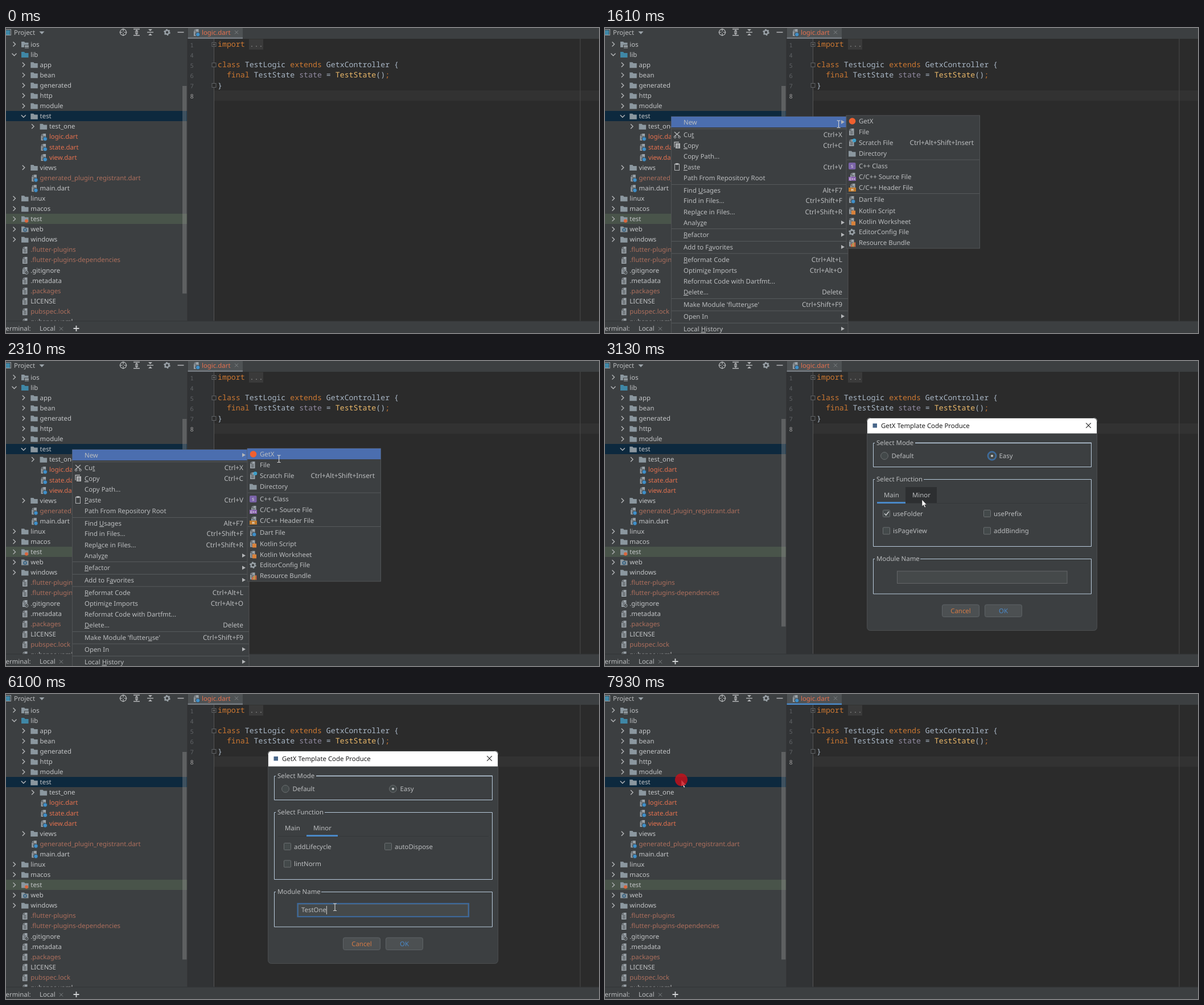
Animation of 1042 by 537 pixels, one loop 8 s. Source, as an HTML page:

```html
<!DOCTYPE html>
<html lang="en">
<head>
<meta charset="utf-8">
<title>Project window</title>
<style>
html, body { margin: 0; width: 100%; height: 100%; overflow: hidden; background: #2b2b2b; }
svg { display: block; width: 1042px; height: 537px; }
text { font: 11.4px "Noto Sans", "Open Sans", sans-serif; white-space: pre; text-rendering: geometricPrecision; }
.code { font: 13.25px "Noto Sans Mono", "DejaVu Sans Mono", monospace; }
.num { font: 10.5px "Noto Sans Mono", "DejaVu Sans Mono", monospace; }
.keys { font-size: 11.8px; text-anchor: end; }
.u { text-decoration: underline; }
</style>
</head>
<body>
<svg id="stage" viewBox="0 0 1042 537"></svg>
<script>
const LOOP = 8000;
const C = { panel: '#3c3f41', text: '#bbbdbf', icon: '#9aa2a8', fresh: '#e5714f', ignored: '#ad6f5d',
  blue: '#4a88c7', pick: '#4b6eaf', key: '#cc7832', code: '#a9b7c6', frame: '#b9cbdc' };

// shape helpers
const rect = (x, y, w, h, fill, more = '') => `<rect x="${x}" y="${y}" width="${w}" height="${h}" fill="${fill}" ${more}/>`;
const box = (x, y, w, h, fill, stroke, r = 0) => rect(x + .5, y + .5, w - 1, h - 1, fill, `stroke="${stroke}" rx="${r}"`);
const disc = (x, y, r, fill, more = '') => `<circle cx="${x}" cy="${y}" r="${r}" fill="${fill}" ${more}/>`;
const line = (d, stroke = C.icon, w = 1.2) => `<path d="${d}" fill="none" stroke="${stroke}" stroke-width="${w}"/>`;
const fill = (d, color) => `<path d="${d}" fill="${color}"/>`;
const group = (id, body, more = '') => `<g id="${id}" ${more}>${body}</g>`;
// y is the middle of the line; baselines sit on whole pixels
const text = (x, y, s, color = C.text, more = '') => `<text x="${x}" y="${Math.round(y + 4)}" fill="${color}" ${more}>${s}</text>`;
// "_" marks the underlined letter
const mnemonic = s => s.replace(/_(.)/, '<tspan class="u">$1</tspan>');
const cross = (x, y, r, color, w = 1) => line(`M${x - r} ${y - r}l${2 * r} ${2 * r}m0 ${-2 * r}l${-2 * r} ${2 * r}`, color, w);

// icons, placed by left edge and middle
const folder = (x, y, color = '#8b979f') => fill(`M${x} ${y - 4.6}h5l1.500 1.800h6v8.200h-12.500z`, color);
const page = (x, y) => fill(`M${x + 4.5} ${y - 6}h5v12h-8.500v-8.500h3.500z`, C.icon) + fill(`M${x + 1} ${y - 3.4}l2.700-2.600v2.600z`, C.icon) +
  line(`M${x + 2.7} ${y - 1}h5m-5 2.300h5m-5 2.300h5`, '#43474a', 1);
const badge = (x, y, color) => page(x, y) + disc(x + 8.2, y + 3.4, 3.7, color, `stroke="${C.panel}" stroke-width=".9"`);
const dart = (x, y) => badge(x, y, '#3f8fc9');
const tagged = (x, y, color, s) => page(x + 2, y - 1) + rect(x, y, 13, 7, color) +
  `<text x="${x + 6.5}" y="${y + 5.8}" fill="#eee" text-anchor="middle" style="font-size:6px;font-weight:700">${s}</text>`;
const gear = (x, y) => disc(x, y, 3.4, 'none', `stroke="${C.icon}" stroke-width="2.4"`) +
  disc(x, y, 5, 'none', `stroke="${C.icon}" stroke-width="1.6" stroke-dasharray="2.6 2.636"`);
const chevron = (x, y, open) => line(open ? `M${x - 4} ${y - 2}l4 4l4-4` : `M${x - 2} ${y - 4}l4 4l-4 4`, '#b4b6b8', 1.4);

// project tree: depth, kind, label, colour
const tree = [
  [0, 'ios', 'ios'], [0, 'lib', 'lib'], [1, 'dir', 'app'], [1, 'dir', 'bean'], [1, 'dir', 'generated'], [1, 'dir', 'http'],
  [1, 'dir', 'module'], [1, 'open', 'test'], [2, 'dir', 'test_one'], [2, 'dart', 'logic.dart', C.fresh],
  [2, 'dart', 'state.dart', C.fresh], [2, 'dart', 'view.dart', C.fresh], [1, 'dir', 'views'],
  [1, 'dart', 'generated_plugin_registrant.dart', C.ignored], [1, 'dart', 'main.dart'],
  [0, 'dir', 'linux'], [0, 'dir', 'macos'], [0, 'spec', 'test'], [0, 'web', 'web'], [0, 'dir', 'windows'],
  [0, 'file', '.flutter-plugins', C.ignored], [0, 'file', '.flutter-plugins-dependencies', C.ignored],
  [0, 'git', '.gitignore'], [0, 'file', '.metadata'], [0, 'file', '.packages', C.ignored], [0, 'file', 'LICENSE'],
  [0, 'file', 'pubspec.lock', C.ignored], [0, 'file', 'pubspec.yaml']
];
function treeRow([depth, kind, label, color = '#c3c5c7'], i) {
  const y = 28.6 + 18.09 * i, x = 27 + 16.3 * depth;
  let out = '';
  if (kind === 'dart') out = dart(x + 1, y + .5);
  else if (kind === 'file') out = page(x + 1, y + .5);
  else if (kind === 'git') out = page(x + 1, y + .5) + disc(x + 9, y + 4, 3, C.panel, `stroke="${C.icon}"`) + line(`M${x + 7} ${y + 6}l4-4`, C.icon, 1);
  else {
    out = chevron(x - 12.5, y, kind === 'lib' || kind === 'open') + folder(x, y, kind === 'lib' ? '#3f87a6' : undefined);
    if (kind === 'ios') out += rect(x + 5, y + 1, 9, 6, C.panel) + rect(x + 6, y + 2, 7, 3, C.icon) + rect(x + 6, y + 6, 7, 1, C.icon);
    if (kind === 'spec') out += disc(x + 9, y + 3.5, 3, '#d8673e');
    if (kind === 'web') out += disc(x + 6.5, y + 1.2, 2.4, '#8b979f', 'stroke="#315f80" stroke-width="1.6"');
  }
  return out + text(x + 16.3, y, label, color);
}

const side = rect(0, 0, 319, 537, C.panel) + rect(0, 146, 318, 18, '#0d293e') + rect(0, 327, 318, 18, '#49544a') +
  '<clipPath id="cut"><rect width="319" height="516"/></clipPath>' +
  `<g clip-path="url(#cut)">${tree.map(treeRow).join('')}</g>` + rect(310, 102, 7.5, 365.5, 'rgba(166,166,166,.32)') +
  box(-4, 2, 13, 11, 'none', C.icon) + rect(0, 4, 7, 8, '#3f87a6') + text(14, 8, 'Project') + fill('M58.500 6h9l-4.500 5z', C.icon) +
  disc(206, 7.5, 5.5, 'none', `stroke="#b4b6b8" stroke-width="1.3"`) + line('M206 1v5m0 3v5m-6.500-6.500h5m3 0h5', '#b4b6b8') +
  line('M224 2h11m-11 11h11m-8-5.500h5', '#b4b6b8', 1.4) + fill('M226.500 6l3-3l3 3zm0 3l3 3l3-3z', '#b4b6b8') +
  line('M248 7.500h11', '#b4b6b8', 1.4) + fill('M250 2l3.500 3.500l3.500-3.500zm0 11l3.500-3.500l3.500 3.500z', '#b4b6b8') +
  gear(283, 7.5) + line('M301.500 7.500h11', '#b4b6b8', 1.5);

// code lines: number, middle, [text, colour] runs
const lines = [
  [1, 29.2, [['import ', C.key]]], [4, 47.3, []],
  [5, 65.3, [['class ', C.key], ['TestLogic ', C.code], ['extends ', C.key], ['GetxController {', C.code]]],
  [6, 83.4, [['  final ', C.key], ['TestState ', C.code], ['state', '#918aa0'], [' = ', C.code], ['TestState', '#eab86a'], ['()', C.code], [';', C.key]]],
  [7, 101.5, [['}', C.code]]], [8, 119.6, []]
];
const fold = (y, s) => box(361.5, y - 4, 8, 8, '#2b2b2b', '#606366') + (s ? line(`M363.500 ${y}h4m-2-2v4`, '#777', 1) : '');
const codeRow = ([n, y, runs]) => text(323.5, y + .3, n, n === 8 ? '#a4a3a3' : '#606366', 'class="num"') +
  text(372, y, runs.map(([s, c]) => `<tspan fill="${c}">${s}</tspan>`).join(''), C.code, 'class="code"');
const editor = rect(319, 0, 723, 19, C.panel) + rect(319, 0, 97, 19, '#4e5254') + rect(319, 16.5, 97, 2.5, '#747a80', 'id="mark"') +
  dart(329, 8) + text(344, 8, 'logic.dart', C.fresh) + cross(405, 7.5, 3, '#7f8385') +
  rect(319, 19, 723, 497, '#2b2b2b') + rect(319, 19, 47, 497, '#313335') + rect(366, 110, 676, 18, '#323232') +
  rect(1008.5, 19, 1, 497, '#4b4b4b') + rect(365, 19, 1, 497, '#555555') + rect(318.5, 0, 1, 516, '#323334') +
  rect(427, 19.5, 25, 18.5, '#3a3a3a') + text(428, 29.2, '...', '#8c8c8c', 'class="code"') +
  lines.map(codeRow).join('') +
  fold(29, true) + fold(65) + fold(101) + rect(372, 111, 1.5, 17, '#bbbbbb', 'id="caret"');

const foot = rect(0, 516, 1042, 21, C.panel) + rect(0, 515.5, 1042, 1, '#333537') + text(-.5, 529.4, 'erminal:') + text(59, 529.4, 'Local') +
  cross(97, 529.5, 3, '#7f8385') + line('M118.500 529h10m-5-5v10', '#d0d2d4', 1.8);

// context menu: middle, label, shortcut (">" opens a submenu)
const entries = [
  [166, 'New', '>'], [188, 'Cu_t', 'Ctrl+X'], [207, '_Copy', 'Ctrl+C'], [226, 'Copy Path...'], [245, '_Paste', 'Ctrl+V'],
  [264, 'Path From Repository Root'], [286, 'Find _Usages', 'Alt+F7'], [304.4, 'Find in Files...', 'Ctrl+Shift+F'],
  [324, 'Repl_ace in Files...', 'Ctrl+Shift+R'], [343, 'Analy_ze', '>'], [364.4, '_Refactor', '>'], [386, 'Add to F_avorites', '>'],
  [408, '_Reformat Code', 'Ctrl+Alt+L'], [427, 'Optimi_ze Imports', 'Ctrl+Alt+O'], [446, 'Reformat Code with Dartfmt...'],
  [465, '_Delete...', 'Delete'], [487, "Make Module 'flutter_use'", 'Ctrl+Shift+F9'], [508, 'Open In', '>'], [530, 'Local _History', '>']
];
const rule = (x, w) => y => rect(x, y, w, 1, '#565a5c');
const entry = ([y, label, keys = '']) => text(138, y, mnemonic(label)) +
  (keys === '>' ? fill(`M415 ${y - 4}l6 3.500l-6 3.500z`, '#b4b6b8') : text(417, y, keys, C.text, 'class="keys"'));
const menu = group('menu', box(116, 155.5, 311.5, 390, C.panel, '#515355') + rect(116.5, 156, 308, 19, C.pick, 'id="hotNew"') +
  [177, 275, 353, 375, 396.5, 476, 497.5, 519].map(rule(117, 310)).join('') + entries.map(entry).join('') +
  line('M122 183l9 8m0-8l-9 8', '#b4b6b8', 1.3) + disc(123, 192, 1.8, 'none', 'stroke="#b4b6b8"') + disc(130.5, 192, 1.8, 'none', 'stroke="#b4b6b8"') +
  line('M122 210v-9h8', '#b4b6b8', 1.3) + rect(124, 203, 8, 9, '#b4b6b8') + line('M126 206h4m-4 2h4m-4 2h4', '#4a4e51', .8) +
  box(122, 239, 9, 12, 'none', '#b4b6b8') + rect(124, 238, 5, 3, '#b4b6b8'));

const news = [
  [164, 'GetX', y => disc(434.5, y, 5.8, '#f0602f')], [183, 'File', y => page(428, y)],
  [202, 'Scratch File', y => page(428, y) + disc(438, y - 4, 3.3, '#3f9fc9')], [221, 'Directory', y => folder(428, y)],
  [243, 'C++ Class', y => rect(428, y - 6, 12.5, 12, '#7a63a8', 'rx="2"') + text(432, y - 1, 's', '#ddd', 'style="font-size:9px"')],
  [262, 'C/C++ Source File', y => tagged(428, y, '#8a63b0', 'C++')], [281, 'C/C++ Header File', y => tagged(428, y, '#c07a2c', 'H')],
  [302, 'Dart File', y => dart(428, y)], [321.5, 'Kotlin Script', y => page(428, y) + rect(433, y, 7, 7, '#d9823b')],
  [340.5, 'Kotlin Worksheet', y => page(428, y) + rect(433, y, 7, 7, '#d9823b')], [359.4, 'EditorConfig File', y => gear(434, y)],
  [378.4, 'Resource Bundle', y => page(428, y) + rect(432, y + 2, 2.2, 5, '#d9673b') + rect(435, y, 2.2, 7, '#d9a03b') + rect(438, y - 1, 2.2, 8, '#d9673b')]
];
const submenu = group('submenu', box(423.5, 153.5, 235.5, 235, C.panel, '#515355') + rect(424, 154, 234.5, 19, C.pick, 'id="hotGet"') +
  [231.5, 291].map(rule(425, 233)).join('') + news.map(([y, s, icon]) => icon(y) + text(446, y, s)).join('') +
  text(648, 202, 'Ctrl+Alt+Shift+Insert', C.text, 'class="keys"'));

// dialog
const fieldset = (y, bottom, label, gap) => line(`M474 ${y + .5}h-2.500V${bottom - .5}H854.500V${y + .5}H${gap}`, C.frame, 1) + text(477, y + .4, label);
const check = (x, y, label, on) => box(x, y - 6.5, 13, 13, '#43494a', '#6b6f71', 1) + text(x + 18, y, label) +
  (on ? line(`M${x + 3} ${y}l2.800 3l5-6.500`, '#c5c7c9', 1.6) : '');
const radio = (x, label) => disc(x, 167, 6.4, '#43494a', 'stroke="#6b6f71"') + text(x + 12.5, 167, label);
const button = (x, label, color) => box(x, 428.5, 66, 22.5, '#4c5052', '#5e6366', 3) + text(x + 33, 440, label, color, 'text-anchor="middle"');
const dialog = group('dialog', rect(460, 100, 405, 375, C.panel, 'rx="6"') + fill('M460 127.500V106a6 6 0 0 1 6-6H859a6 6 0 0 1 6 6V127.500z', '#fff') +
  box(460, 100, 405, 375, 'none', '#4b4d4f', 6) + rect(470.5, 110, 7.5, 7.5, '#49678a') + text(485, 114, 'GetX Template Code Produce', '#1c1c1c') +
  cross(849.5, 113.5, 4.3, '#222', 1.1) +
  fieldset(144, 187, 'Select Mode', 545) + rect(545, 143.5, 310, 1.6, C.frame) + fieldset(208, 327, 'Select Function', 560) + fieldset(348, 410.5, 'Module Name', 554) +
  radio(491, 'Default') + radio(680, 'Easy') + disc(680, 167, 7.2, 'none', 'stroke="#3d6c9e" stroke-width="2.4" id="ring"') + disc(680, 167, 2.1, '#c5c7c9') +
  rect(478, 250, 370, 1, '#35383a') + rect(528, 222, 55, 28, '#2d2f31', 'id="hover"') + rect(478, 248, 50, 3, C.blue, 'id="bar"') +
  text(490, 236, 'Main') + text(540, 236, 'Minor') +
  group('main', check(488, 268.5, 'useFolder', true) + check(665, 268.5, 'usePrefix') + check(488, 299, 'isPageView') + check(665, 299, 'addBinding')) +
  group('minor', check(488, 268.5, 'addLifecycle') + check(665, 268.5, 'autoDispose') + check(488, 299, 'lintNorm')) +
  box(513, 369.5, 299.5, 22.5, '#45494a', '#646668') + rect(512.5, 369, 300.5, 23, 'none', 'stroke="#3d6899" stroke-width="2.2" id="focus"') +
  text(519, 380.4, '', '#bbbdbf', 'id="typed"') + rect(519, 373, 1, 15, '#d0d0d0', 'id="insert"') +
  button(592, 'Cancel', '#d37a45') + button(667, 'OK', C.blue));

const pointer = group('arrow', '<path d="M0 0v12l2.700-2.500l2 4.500l1.900-.8l-1.900-4.200h3.600z" fill="#fff" stroke="#222" stroke-width=".6"/>') +
  group('beam', line('M-3 -6h2l1 1l1-1h2M0 -5v11M-3 6.500h2l1-1l1 1h2', '#d4d4d4', 1.1)) + disc(0, 0, 11, 'red', 'id="click" opacity=".82"');

document.getElementById('stage').innerHTML = side + editor + foot + menu + submenu + dialog + pointer;
const $ = id => document.getElementById(id);
const show = (id, on) => $(id).setAttribute('visibility', on ? 'inherit' : 'hidden');

// pointer path: time, x, y
const path = [[70, 838, 498], [200, 765, 452], [400, 480, 318], [600, 200, 184], [740, 116, 156], [940, 116, 156], [1070, 182, 155],
  [1200, 255, 161], [1400, 345, 166], [1680, 432, 170], [1950, 478, 172], [2400, 480, 172], [2520, 482, 185], [2720, 484, 187], [2900, 518, 214],
  [3130, 557, 244], [3530, 557, 246], [3700, 565, 310], [3860, 580, 376], [4210, 580, 377], [4280, 578, 375], [6860, 578, 375],
  [6960, 566, 406], [7070, 524, 410], [7220, 420, 352], [7380, 290, 262], [7540, 178, 190], [7650, 142, 169], [7780, 134, 151], [8000, 134, 151]];
function place(t) {
  const i = Math.max(1, path.findIndex(p => p[0] >= t));
  const [a, x, y] = path[i - 1], [b, u, v] = path[i], k = Math.max(0, (t - a) / (b - a));
  return [x + (u - x) * k, y + (v - y) * k];
}
const RED = '#c8101a', YELLOW = '#d6cc22';
const clicks = [[880, 1010, RED], [2180, 2310, YELLOW], [3340, 3460, YELLOW], [3880, 4010, YELLOW], [7930, 8000, RED]];
const keys = [4680, 4880, 5020, 5150, 5550, 5900, 6100];

function draw(t) {
  const within = (a, b) => t >= a && t < b;
  $('mark').setAttribute('fill', within(880, 1010) || t >= 6370 ? C.blue : '#747a80');
  show('caret', within(7400, 7930));
  show('menu', within(1010, 2380));
  show('hotNew', within(1140, 2380));
  show('submenu', within(1400, 2380));
  show('hotGet', within(1660, 2380));

  const inDialog = within(2450, 6300);
  show('dialog', inDialog);
  $('dialog').setAttribute('opacity', t < 2510 ? .6 : 1);
  const minor = t >= 3400, focused = t >= 3950;
  show('main', !minor);
  show('minor', minor);
  show('hover', within(3000, 3590));
  $('bar').setAttribute('x', minor ? 528 : 478);
  $('bar').setAttribute('width', minor ? 55 : 50);
  show('ring', !focused);
  show('focus', focused);
  const typed = 'TestOne'.slice(0, keys.filter(k => t >= k).length);
  if ($('typed').textContent !== typed) $('typed').textContent = typed;
  show('insert', t >= 4480);
  $('insert').setAttribute('x', 519 + (typed ? $('typed').getComputedTextLength() : 0));

  const [x, y] = place(t);
  const beam = inDialog ? y > 368 : x > 319;
  const at = `translate(${x.toFixed(2)} ${y.toFixed(2)})`;
  for (const id of ['arrow', 'beam', 'click']) $(id).setAttribute('transform', at);
  show('arrow', t >= 70 && !beam);
  show('beam', t >= 70 && beam);
  const hit = clicks.find(([a, b]) => within(a, b));
  show('click', hit);
  if (hit) $('click').setAttribute('fill', hit[2]);
}

const start = performance.now();
function tick() {
  draw((performance.now() - start) % LOOP);
  requestAnimationFrame(tick);
}
tick();
</script>
</body>
</html>
```
